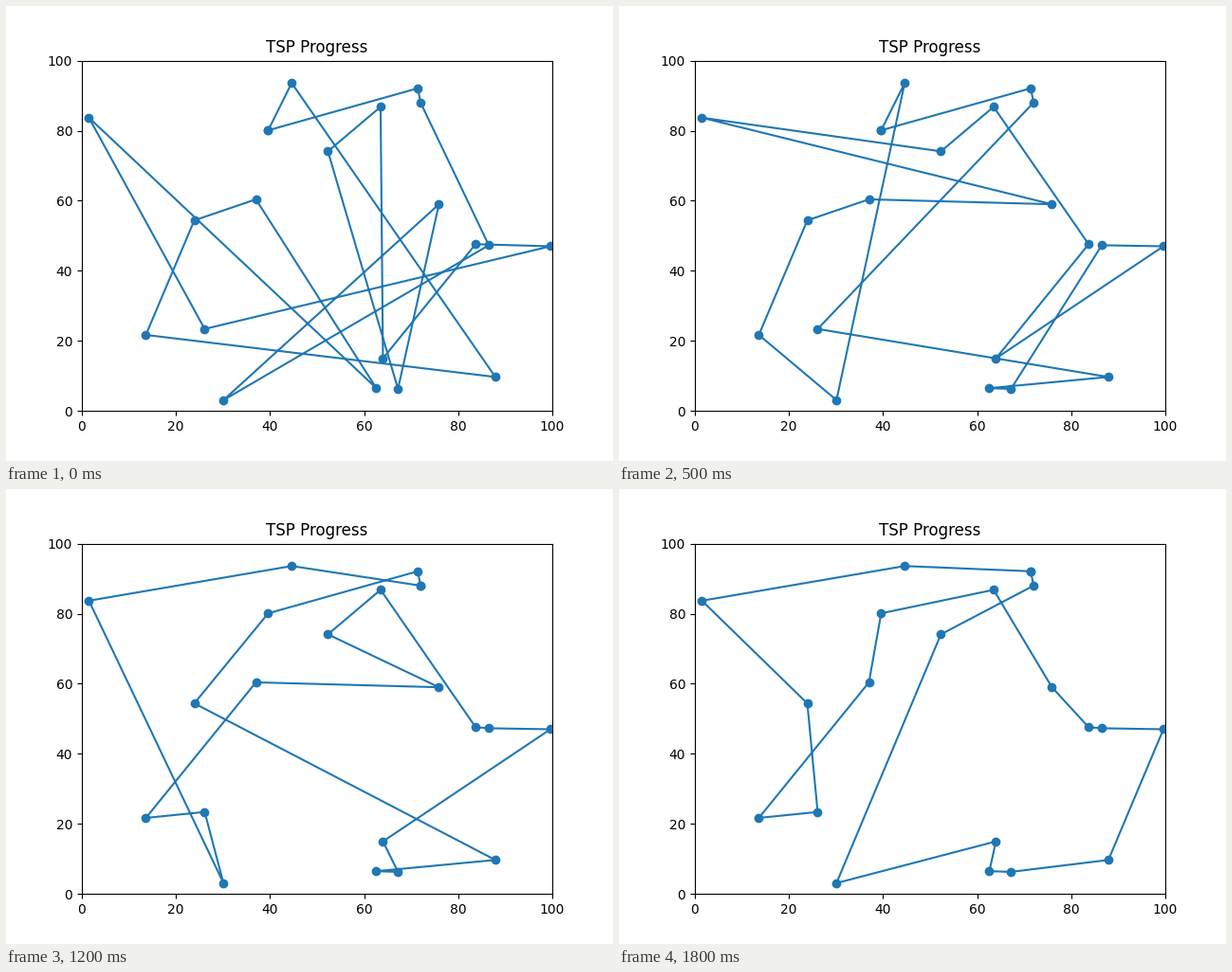
Animation of 640 by 480 pixels, one loop 1.9 s. Source, as a matplotlib script:

```python
import matplotlib.pyplot as plt
from matplotlib.animation import FuncAnimation

CITIES = {
    "A": (1.5, 83.7), "B": (23.9, 54.4), "C": (37.0, 60.4), "D": (39.6, 80.1),
    "E": (44.6, 93.6), "F": (52.3, 74.1), "G": (63.5, 86.8), "H": (71.4, 92.1),
    "I": (72.0, 88.0), "J": (75.9, 59.0), "K": (83.7, 47.6), "L": (86.5, 47.3),
    "M": (99.6, 47.0), "N": (87.9, 9.7), "O": (64.0, 15.0), "P": (62.6, 6.5),
    "Q": (67.2, 6.3), "R": (30.1, 3.1), "S": (26.1, 23.4), "T": (13.6, 21.7),
}
START = "DHILRJQFGOKMSAPCBTNE"
# Each step of the search swaps two cities in the tour.
SWAPS = "LF JP RN GM FS AJ AC DI LO SB TR AT GJ NO HI FG BR DF".split()


def swap(tour, pair):
    a, b = pair
    return tour.translate(str.maketrans(a + b, b + a))


def build_tours():
    tours = [START]
    for pair in SWAPS:
        tours.append(swap(tours[-1], pair))
    return tours


TOURS = build_tours()

fig, ax = plt.subplots(figsize=(6.4, 4.8), dpi=100)
ax.set(xlim=(0, 100), ylim=(0, 100), title="TSP Progress")
line, = ax.plot([], [], "o-", color="tab:blue")


def draw(step):
    tour = TOURS[step]
    xs, ys = zip(*(CITIES[c] for c in tour + tour[0]))
    line.set_data(xs, ys)
    return (line,)


anim = FuncAnimation(fig, draw, frames=len(TOURS), interval=100,
                     repeat=True, repeat_delay=0)
plt.show()
```
